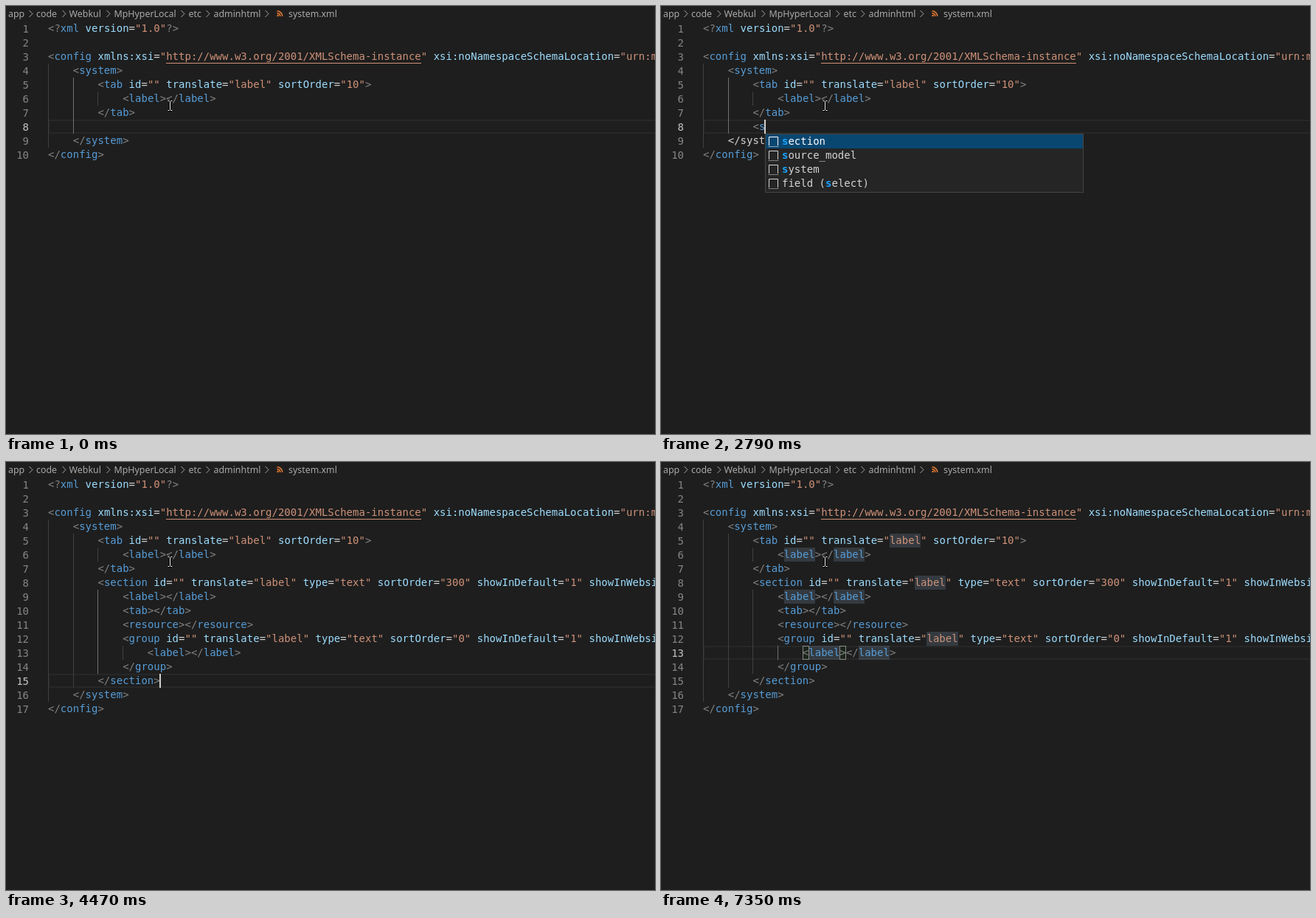
Recreate the animation shown at these times as an HTML page. Size 880 by 580 pixels, loop 8 s.

```html
<!DOCTYPE html>
<html lang="en">
<head>
<meta charset="utf-8">
<title>XML snippet completion</title>
<style>
html, body { margin: 0; width: 100%; height: 100%; overflow: hidden; background: #1e1e1e; }
#stage { position: relative; width: 880px; height: 580px; overflow: hidden; background: #1e1e1e;
  font: 14px/19px "DejaVu Sans Mono", monospace; color: #d4d4d4; }
#stage div, #stage svg { position: absolute; box-sizing: border-box; }
#stage div { white-space: pre; }
#chrome { left: 0; top: 0; }
#chrome text { font: 12.4px "Noto Sans", sans-serif; fill: #a9a9a9; }
.num { left: 0; width: 31px; text-align: right; color: #858585; }
.num.on { color: #c6c6c6; }
.row { left: 57px; }
.p { color: #808080; } .t { color: #569cd6; } .a { color: #9cdcfe; } .s { color: #ce9178; }
.current { left: 57px; width: 840px; height: 19px; border: 2px solid #282828; }
.guide { width: 1px; background: #404040; }
.guide.on { background: #707070; }
.word { height: 19px; background: #add6ff26; }
.bracket { height: 19px; border: 1px solid #888; background: rgba(0, 100, 0, .1); }
.caret { width: 2px; height: 19px; background: #d0d0ce; }
.link { left: 217px; top: 77px; width: 346px; height: 1px; background: #ce9178; }
.popup { top: 173px; width: 432px; background: #252526; border: 1px solid #454545; overflow: hidden; }
.item { left: 0; width: 430px; height: 19px; padding-left: 22px; }
.item.on { background: #094771; color: #fff; }
.item svg { left: 2px; top: 2px; }
.item b { color: #18a3ff; }
.bar { right: 0; top: 76px; width: 10px; height: 154px; }
</style>
</head>
<body>
<div id="stage">
  <div id="editor"></div>
  <svg id="chrome" width="880" height="580" fill="none"></svg>
</div>
<script>
const LOOP = 8000, CHAR = 14 * 0.60205, LEFT = 57, TOP = 21, ROW = 19;
const colX = c => LEFT + c * CHAR;
const px = c => Math.round(colX(c));
const rowY = n => TOP + (n - 1) * ROW;

const HEAD = [
  '<?xml version="1.0"?>',
  '',
  '<config xmlns:xsi="http://www.w3.org/2001/XMLSchema-instance" xsi:noNamespaceSchemaLocation="urn:magento:module:Magento_Config:etc/system_file.xsd">',
  '    <system>',
  '        <tab id="" translate="label" sortOrder="10">',
  '            <label></label>',
  '        </tab>'
];
const SHOW = 'showInDefault="1" showInWebsite="1" showInStore="1">';
const SECTION = [
  '        <section id="" translate="label" type="text" sortOrder="300" ' + SHOW,
  '            <label></label>',
  '            <tab></tab>',
  '            <resource></resource>',
  '            <group id="" translate="label" type="text" sortOrder="0" ' + SHOW,
  '                <label></label>',
  '            </group>',
  '        </section>'
];
const TAIL = ['    </system>', '</config>'];

// Suggestions; matched letters stand in square brackets
const LISTS = {
  all: ['field (password)', 'field (select)', 'field (text)', 'group', 'label', 'resource',
    'section', 'source_model', 'system', 'tab', 'tab (reference)', 'validate'],
  s: ['[s]ection', '[s]ource_model', '[s]ystem', 'field ([s]elect)'],
  se: ['[se]ction', '[s]ourc[e]_model', '[s]yst[e]m', 'field ([se]lect)'],
  sec: ['[sec]tion', '[s]our[ce]_model', 'field ([se]le[c]t)']
};

// Guides: column, first row, last row
const SHORT_GUIDES = [[0, 4, 9], [4, 5, 8], [8, 6, 6]];
const LONG_GUIDES = [[0, 4, 16], [4, 5, 15], [8, 6, 6], [8, 9, 14], [12, 13, 13]];

// Each step changes part of the state from its time on
const STEPS = [
  [0, { typed: '', open: false, list: '', bar: 0, line: 8, col: 8, caret: false, guide: 1, brackets: null, words: false }],
  [30, { caret: true }],
  [390, { typed: '<', col: 9 }],
  [510, { list: 'all', bar: .2 }],
  [630, { bar: .4 }],
  [1350, { caret: false }],
  [2190, { caret: true }],
  [2790, { typed: '<s', col: 10, list: 's' }],
  [3030, { typed: '<se', col: 11 }],
  [3150, { list: 'se' }],
  [3390, { typed: '<sec', col: 12 }],
  [3510, { list: 'sec' }],
  [4350, { caret: false }],
  [4470, { open: true, list: '', line: 15, col: 18, caret: true, guide: 3 }],
  [4590, { brackets: [8, 17] }],
  [5310, { caret: false }],
  [6270, { line: 14, caret: true, brackets: null }],
  [6390, { guide: 4 }],
  [6510, { line: 13 }],
  [6750, { col: 17, brackets: [16, 22] }],
  [6990, { words: true }],
  [7350, { caret: false }]
];
let state = {};
const STATES = STEPS.map(([, patch]) => state = { ...state, ...patch });

const esc = s => s.replace(/&/g, '&amp;').replace(/</g, '&lt;');
const box = (cls, x, y, style = '', body = '') =>
  `<div class="${cls}" style="left:${x}px;top:${y}px;${style}">${body}</div>`;

function paint(line) {
  const span = (cls, s) => s ? `<span class="${cls}">${esc(s)}</span>` : '';
  return line.replace(/(<[\/?]?)(\w+)|([\w:]+)(?==)|("[^"]*")|(\??>)/g,
    (m, open, tag, attr, str, close) =>
      span('p', open) + span('t', tag) + span('a', attr) + span('s', str) + span('p', close));
}

const ICON = '<svg width="16" height="16" fill="none" stroke="currentColor">' +
  '<path d="M2.5 13V1.5H14.5V13"/><path d="M2 14.5H15" stroke-dasharray="1 1"/></svg>';

function popup(s) {
  const items = LISTS[s.list], full = s.list === 'all';
  const chosen = full ? 9 : 0, shift = full ? 2 : 0;
  const anchor = full ? 9 : 8 + s.list.length + 1;
  const rows = items.map((text, i) =>
    box('item' + (i === chosen ? ' on' : ''), 0, shift + i * ROW, '',
      ICON + text.replace(/\[/g, '<b>').replace(/\]/g, '</b>')));
  const bar = full ? `<div class="bar" style="background:rgba(121,121,121,${s.bar})"></div>` : '';
  return `<div class="popup" style="left:${px(anchor)}px;height:${items.length * ROW + 4}px">${rows.join('')}${bar}</div>`;
}

function draw(s) {
  const lines = [...HEAD, ...(s.open ? SECTION : [' '.repeat(8) + s.typed]), ...TAIL];
  const broken = !s.open && s.typed.length > 1;
  let out = `<div class="current" style="top:${rowY(s.line)}px"></div>`;

  (s.open ? LONG_GUIDES : SHORT_GUIDES).forEach(([c, from, to], i) => {
    out += box('guide' + (i === s.guide ? ' on' : ''), px(c), rowY(from), `height:${(to - from + 1) * ROW}px`);
  });
  if (s.words) lines.forEach((line, i) => {
    for (const m of line.matchAll(/label/g))
      out += box('word', colX(m.index), rowY(i + 1), `width:${5 * CHAR}px`);
  });
  if (s.brackets) for (const c of s.brackets)
    out += box('bracket', px(c), rowY(s.line), 'width:9px');

  lines.forEach((line, i) => {
    const y = rowY(i + 1);
    const plain = broken && i === 8;
    out += `<div class="num${i + 1 === s.line ? ' on' : ''}" style="top:${y + 1}px">${i + 1}</div>`;
    out += `<div class="row" style="top:${y}px">${plain ? esc(line) : paint(line.replace(/<$/, '&lt;'))}</div>`;
  });
  out += '<div class="link"></div>';
  if (s.caret) out += box('caret', px(s.col) - 1, rowY(s.line));
  if (s.list) out += popup(s);
  document.getElementById('editor').innerHTML = out;
}

// Breadcrumbs, file icon and mouse pointer stay still
const crumbs = [['app', 3], ['code', 41], ['Webkul', 85.5], ['MpHyperLocal', 146.5],
  ['etc', 247.5], ['adminhtml', 281.5], ['system.xml', 383]];
const beam = 'M219.5 128.5H221.5L222.5 129.5L223.5 128.5H225.5M222.5 129.5V140.5M219.5 141.5H221.5L222.5 140.5L223.5 141.5H225.5';
document.getElementById('chrome').innerHTML =
  crumbs.map(([t, x]) => `<text x="${x}" y="15">${t}</text>`).join('') +
  [31.5, 76.5, 136.5, 237.5, 271.5, 351.5].map(x =>
    `<path d="M${x} 6L${x + 4.5} 10.5L${x} 15" stroke="#a9a9a9"/>`).join('') +
  '<circle cx="368.6" cy="13" r="1.3" fill="#e37933"/>' +
  '<path d="M367.5 9.6A4.3 4.3 0 0 1 371.8 14M367.5 6.8A7.2 7.2 0 0 1 374.7 14" stroke="#e37933" stroke-width="1.6"/>' +
  `<path d="${beam}" stroke="#000" stroke-width="3"/><path d="${beam}" stroke="#fff"/>`;

let shown = -1;
function tick() {
  const t = performance.now() % LOOP;
  const i = STEPS.findLastIndex(([at]) => at <= t);
  if (i !== shown) draw(STATES[shown = i]);
  requestAnimationFrame(tick);
}
tick();
</script>
</body>
</html>
```
